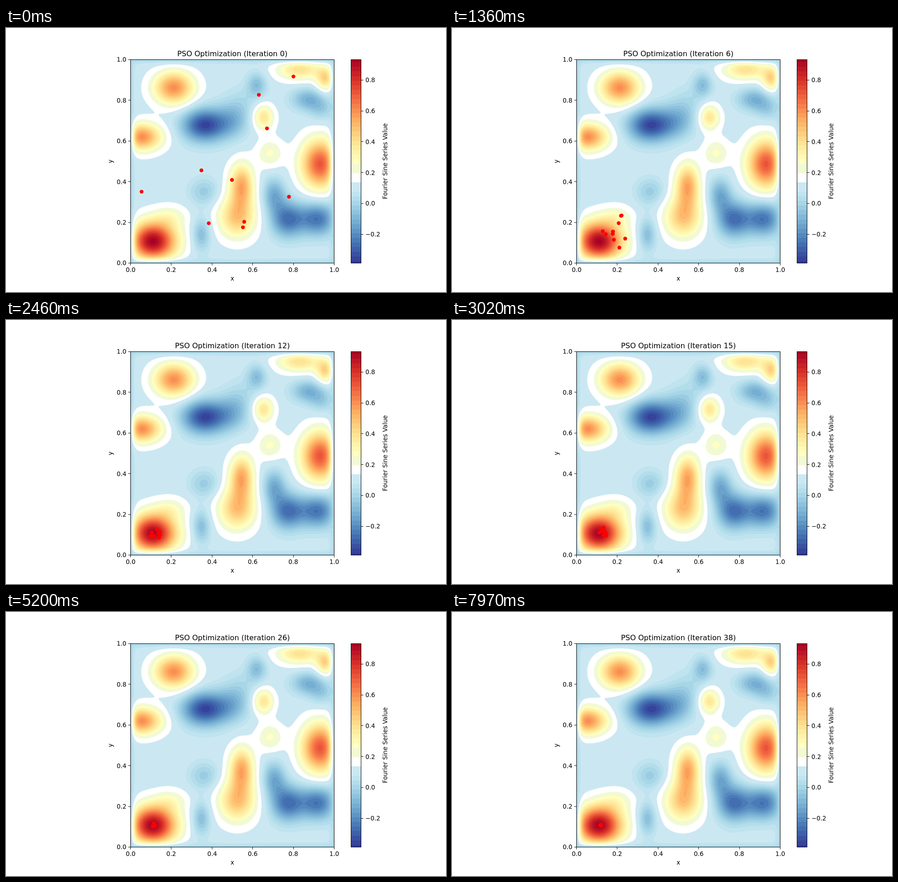
Animation of 966x580 px, one loop 7990 ms. Source, as an HTML page with a canvas:

```html
<!DOCTYPE html>
<html lang="en">
<head>
<meta charset="utf-8">
<title>PSO Optimization</title>
<style>
  html, body { margin: 0; width: 100%; height: 100%; overflow: hidden; background: #fff; }
  canvas { display: block; }
</style>
</head>
<body>
<canvas id="stage" width="966" height="580"></canvas>
<script>
const W = 966, H = 580, LOOP = 7990;
const plot = { x: 273.5, y: 69.5, size: 447 };
const bar = { x: 757.5, width: 22, low: -0.387, high: 0.933 };
const bottom = plot.y + plot.size;
const SMALL = '13.42px "DejaVu Sans", sans-serif';
const LARGE = '16.1px "DejaVu Sans", sans-serif';

// Gaussian bumps: height, centre x, centre y, spread x, spread y
const hills = [
  [.83, .11, .107, .082, .068],
  [.12, .2, .23, .06, .04],
  [.51, .05, .62, .073, .048],
  [.5, .212, .862, .07, .058],
  [.31, .83, .955, .08, .04],
  [.33, .96, .905, .033, .042],
  [.29, .652, .717, .037, .044],
  [.165, .685, .54, .046, .05],
  [.37, .523, .225, .066, .073],
  [.43, .545, .385, .043, .075],
  [.62, .932, .487, .067, .086]
];
const basins = [
  [-.45, .362, .678, .077, .058],
  [-.16, .5, .7, .06, .062],
  [-.06, .55, .79, .06, .06],
  [-.17, .62, .877, .034, .043],
  [-.2, .87, .805, .058, .04],
  [-.11, .94, .755, .045, .042],
  [-.13, .362, .35, .051, .048],
  [-.18, .347, .14, .032, .058],
  [-.35, .77, .215, .057, .062],
  [-.35, .92, .217, .065, .058],
  [-.22, .705, .335, .04, .06]
];

const ramp = ['313695', '4575b4', '74add1', 'abd9e9', 'e0f3f8', 'ffffbf',
              'fee090', 'fdae61', 'f46d43', 'd73027', 'a50026']
  .map(hex => [0, 2, 4].map(i => parseInt(hex.slice(i, i + 2), 16)));
const paleBands = [[203, 232, 242], [255, 255, 255], [242, 250, 212]];

function bandColor(value) {
  if (value >= .075 && value < .255) return paleBands[Math.floor((value - .075) / .06)];
  const middle = .075 + (Math.floor((value - .075) / .03) + .5) * .03;
  const f = Math.min(.9999, Math.max(0, (middle - bar.low) / (bar.high - bar.low))) * 10;
  const i = Math.floor(f);
  return ramp[i].map((c, k) => c + (ramp[i + 1][k] - c) * (f - i));
}

function makeCanvas(width, height) {
  const canvas = document.createElement('canvas');
  canvas.width = width;
  canvas.height = height;
  return canvas;
}

function drawField() {
  const n = 2 * plot.size, canvas = makeCanvas(n, n), c = canvas.getContext('2d');
  const image = c.createImageData(n, n);
  const sample = rule => Float64Array.from({ length: n }, (_, i) => rule((i + .5) / n));
  const bell = (center, spread) => sample(u => Math.exp(-.5 * ((u - center) / spread) ** 2));
  const bumps = [...hills, ...basins].map(([height, x, y, sx, sy]) =>
    ({ height, px: bell(x, sx), py: bell(y, sy) }));
  // The surface falls to zero on all four sides.
  const edge = sample(u => Math.tanh(Math.min(u, 1 - u) / .022));
  for (let row = 0, p = 0; row < n; row++) {
    const j = n - 1 - row;
    const weights = bumps.map(b => b.height * b.py[j]);
    for (let i = 0; i < n; i++, p += 4) {
      let value = .1;
      for (let k = 0; k < bumps.length; k++) value += weights[k] * bumps[k].px[i];
      image.data.set(bandColor(value * edge[i] * edge[j]), p);
      image.data[p + 3] = 255;
    }
  }
  c.putImageData(image, 0, 0);
  return canvas;
}

// Text starts on a whole pixel.
function write(c, text, x, y, align = .5, font = SMALL) {
  c.font = font;
  c.fillStyle = '#000';
  c.fillText(text, Math.round(x - c.measureText(text).width * align), Math.round(y));
}

function writeUp(c, text, x, y) {
  c.save();
  c.translate(x, y);
  c.rotate(-Math.PI / 2);
  write(c, text, 0, 0);
  c.restore();
}

const crisp = v => Math.floor(v) + .5;

function line(c, x, y, dx, dy) {
  c.beginPath();
  c.moveTo(x, y);
  c.lineTo(x + dx, y + dy);
  c.stroke();
}

function drawChart() {
  const canvas = makeCanvas(W, H), c = canvas.getContext('2d');
  c.fillStyle = '#fff';
  c.fillRect(0, 0, W, H);
  c.imageSmoothingQuality = 'high';
  c.drawImage(drawField(), plot.x, plot.y, plot.size, plot.size);
  for (let y = 0; y < plot.size; y++) {
    const value = bar.low + (1 - (y + .5) / plot.size) * (bar.high - bar.low);
    c.fillStyle = `rgb(${bandColor(value)})`;
    c.fillRect(bar.x, Math.floor(plot.y) + y, bar.width, 1);
  }
  c.strokeStyle = '#000';
  for (let i = 0; i <= 5; i++) {
    const label = (i / 5).toFixed(1);
    const x = plot.x + plot.size * i / 5, y = bottom - plot.size * i / 5;
    line(c, crisp(x), bottom, 0, 5);
    line(c, plot.x, crisp(y), -5, 0);
    write(c, label, x, 536);
    write(c, label, plot.x - 9.4, y + 4.8, 1);
  }
  for (let i = -1; i <= 4; i++) {
    const value = i / 5, right = bar.x + bar.width;
    const y = bottom - (value - bar.low) / (bar.high - bar.low) * plot.size;
    line(c, right, crisp(y), 5, 0);
    write(c, value.toFixed(1).replace('-', '\u2212'), right + 9.8, y + 4.8, 0);
  }
  c.strokeRect(bar.x, plot.y, bar.width, plot.size);
  write(c, 'x', plot.x + plot.size / 2, 554.5);
  writeUp(c, 'y', 234, 293);
  writeUp(c, 'Fourier Sine Series Value', 837, 293);
  return canvas;
}

const goal = [.117, .107];
const starts = [[.8, .917], [.63, .827], [.67, .662], [.348, .456], [.054, .351],
                [.498, .409], [.778, .326], [.384, .196], [.558, .203], [.552, .176]];
const random = seed => Math.abs(Math.sin(seed * 127.1) * 43758.5) % 1;

// Each particle rushes to the goal, then circles it ever more tightly.
function position(start, index, iteration) {
  const rush = Math.exp(-.3 * iteration);
  const orbit = .07 * (.4 + random(index + 1)) * (1 - Math.exp(-iteration)) * Math.exp(-.085 * iteration);
  const angle = 2 * Math.PI * random(index + 31) + .8 * iteration;
  const swing = [Math.cos(angle), Math.sin(angle)];
  return goal.map((g, axis) => g + (start[axis] - g) * rush + orbit * swing[axis]);
}

const ctx = document.getElementById('stage').getContext('2d');
const chart = drawChart();

function draw() {
  const t = Math.floor(performance.now() % LOOP / 20) * 20;
  // The last iterations run a little slower.
  const iteration = t < 6400 ? t / 200 : 32 + (t - 6400) / 228;
  ctx.drawImage(chart, 0, 0);
  ctx.save();
  ctx.beginPath();
  ctx.rect(plot.x, plot.y, plot.size, plot.size);
  ctx.clip();
  ctx.fillStyle = '#f00';
  starts.forEach((start, index) => {
    const [x, y] = position(start, index, iteration);
    ctx.beginPath();
    ctx.arc(plot.x + x * plot.size, bottom - y * plot.size, 4.2, 0, 2 * Math.PI);
    ctx.fill();
  });
  ctx.restore();
  ctx.strokeStyle = '#000';
  ctx.strokeRect(plot.x, plot.y, plot.size, plot.size);
  write(ctx, `PSO Optimization (Iteration ${Math.floor(iteration)})`,
    plot.x + plot.size / 2, 62, .5, LARGE);
  requestAnimationFrame(draw);
}
draw();
</script>
</body>
</html>
```
